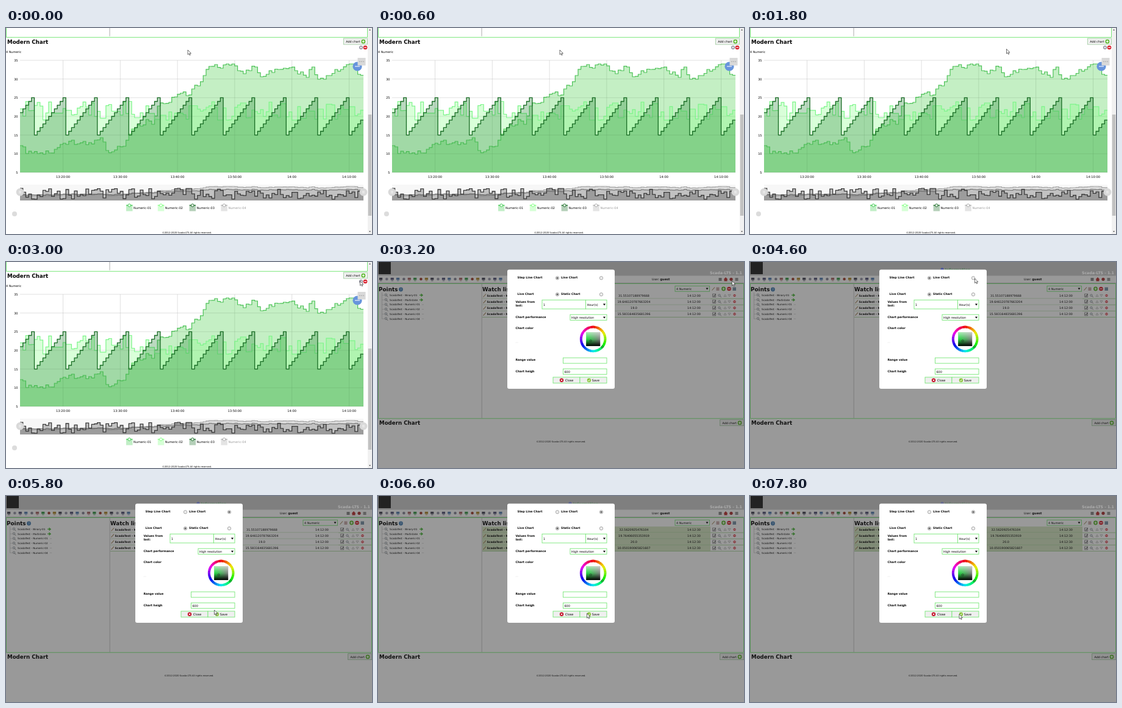
These frames come from a looping animation (600x338 px, 8 s). An HTML page:

```html
<!DOCTYPE html>
<html lang="en">
<head>
<meta charset="utf-8">
<title>Modern Chart</title>
<style>
html, body { margin: 0; width: 100%; height: 100%; overflow: hidden; background: #fff; }
svg { display: block; width: 600px; height: 338px; font-family: "DejaVu Sans", sans-serif; }
</style>
</head>
<body>
<svg id="stage" viewBox="0 0 600 338"></svg>
<script>
const LOOP = 8000, STEP = 200, OPEN = 3200, PICK = 5200, REFRESH = 6000;
const GREEN = '#78e678';

// Markup helpers
const text = (x, y, s, size = 5, more = '') => `<text x="${x}" y="${y}" font-size="${size}" ${more}>${s}</text>`;
const rect = (x, y, w, h, fill, more = '') => `<rect x="${x}" y="${y}" width="${w}" height="${h}" fill="${fill}" ${more}/>`;
const disc = (x, y, r, fill, more = '') => `<circle cx="${x}" cy="${y}" r="${r}" fill="${fill}" ${more}/>`;
const path = (d, stroke, w = 1, more = '') => `<path d="${d}" fill="none" stroke="${stroke}" stroke-width="${w}" ${more}/>`;
const group = (id, body) => `<g id="${id}">${body}</g>`;
const BOLD = 'font-weight="bold"', MID = 'text-anchor="middle"', END = 'text-anchor="end"';

function seeded(seed) {
  return () => (seed = (seed * 16807) % 2147483647) / 2147483647;
}

const plus = (x, y) => disc(x, y, 3.4, '#5bb82d') + path(`M${x - 2} ${y}h4M${x} ${y - 2}v4`, '#fff', 1.2);
const minus = (x, y, r = 3.3) => disc(x, y, r, '#d81e2c') + path(`M${x - r * .6} ${y}h${r * 1.2}`, '#fff', 1.2);
const lens = (x, y) => disc(x, y, 1.8, '#dfe8f0', 'stroke="#888" stroke-width=".7"') + path(`M${x + 1.3} ${y + 1.3}l2 2`, '#777', .9);
const pencil = (x, y) => path(`M${x - 2} ${y + 2.5}l4.5-5`, '#a58a60', 1.1);
const addButton = (x, y) => rect(x, y, 39, 10, '#f1f1f1', `stroke="#8fc48f" stroke-width=".7"`) +
  text(x + 3.8, y + 6.8, 'Add chart', 4.8) + plus(x + 32.3, y + 5.2);
const field = (x, y, w, h, label = '', arrow = false) => rect(x, y, w, h, '#fff', `stroke="${GREEN}" stroke-width=".9"`) +
  text(x + 2, y + h / 2 + 1.9, label, 4.9) +
  (arrow ? `<path d="M${x + w - 6} ${y + h / 2 - 1.2}h4l-2 3z"/>` : '');

// Chart data: one value every 30 seconds
const N = 120, X0 = 23, DX = 563 / N, BASE = 237;
const scaleY = v => BASE - (v - 5) * 184 / 30;
const trendKnots = [193, 206, 205, 206, 207, 205, 199, 191, 191, 184, 190, 186, 188, 184, 180, 201, 203, 194, 194, 174,
  164, 161, 150, 158, 128, 124, 122, 113, 107, 111, 100, 95, 78, 63, 60, 66, 59, 59, 70, 75,
  70, 64, 80, 76, 73, 68, 66, 65, 70, 72, 81, 64, 84, 84, 78, 68, 68, 60, 59, 76];
const jitter = seeded(77), wobble = seeded(4242), spikes = seeded(991);
const trend = Array.from({ length: N }, (_, i) => {
  const a = trendKnots[i >> 1], b = trendKnots[Math.min((i >> 1) + 1, 59)];
  return i % 2 ? Math.max(59, (a + b) / 2 + (jitter() - .5) * 9) : a;
});
let held = 22;
const noise = Array.from({ length: N }, () => {
  if (wobble() > .25) held = 19 + 5 * wobble() ** 1.2;
  return scaleY(held);
});
const saw = Array.from({ length: N }, (_, i) => scaleY(15 + (i + 6) % 11));
const pulse = Array.from({ length: N }, () => 263 + 18 * spikes());

const stepLine = ys => `M${X0} ${ys[0].toFixed(1)}` +
  ys.map((y, i) => `V${y.toFixed(1)}H${(X0 + (i + 1) * DX).toFixed(1)}`).join('');
const area = (ys, base, fill, stroke, w = 1.2) => {
  const d = stepLine(ys);
  return `<path d="${d}V${base}H${X0}Z" fill="${fill}" fill-opacity=".3"/>` + path(d, stroke, w);
};

function chartPage() {
  let s = rect(0, 0, 600, 338, '#fff');
  s += path('M.5 0V15.3H592.5V0', GREEN, 1) + path('M170 0V13.5', '#999', .8);
  s += text(2, 26, 'Modern Chart', 8.7, BOLD) + text(0, 41, '4 Numeric', 4.9) + addButton(553.5, 17);
  s += disc(582, 32, 2.3, '#eee', 'stroke="#8a8a9a" stroke-width="1.3"') + minus(589, 32);
  let grid = '';
  for (let v = 5; v <= 35; v += 5) {
    grid += `M${X0} ${scaleY(v).toFixed(1)}H586`;
    s += text(19.5, scaleY(v) + 1.9, v, 5, END);
  }
  ['13:20:00', '13:30:00', '13:40:00', '13:50:00', '14:00', '14:10:00'].forEach((label, i) => {
    const x = 93.5 + i * 93.8;
    grid += `M${x} 53V237`;
    s += text(x, 246, label, 5.1, MID);
  });
  s += path(grid, '#d9d9d9', .6);
  s += area(trend, BASE, '#3eca3e', '#4cc257') + area(noise, BASE, '#80ff80', '#7df58a') + area(saw, BASE, '#1f8030', '#176b23', 1.3);
  s += path(grid, '#000', .5, 'opacity=".07"');
  s += disc(576, 63, 7.6, '#6794dc') + path('M572 63h8', '#fff', 1.1);
  s += rect(576.5, 49, 13, 12.5, '#d9d9d9') + [580, 583, 586].map(x => disc(x, 55, .6, '#666')).join('');

  // Range preview
  s += rect(23, 257, 563, 26, '#f7f7f7');
  s += area(trend.map(y => 260 + (y - 59) * .105), 283, '#999', '#a5a5a5');
  s += area(trend.map((y, i) => 264.5 + (y - 59) * .06 + i % 3 * .4), 283, '#888', '#666', 1);
  s += area(pulse, 283, '#444', '#3a3a3a', 1.3);
  s += disc(23, 269.3, 6.3, '#d9d9d9') + disc(586, 269.3, 6.3, '#d9d9d9');
  s += path('M22 267v4.6M24 267v4.6M585 267v4.6M587 267v4.6', '#fff', .7);

  ['#3eca50', '#80ff80', '#176b23', '#aaa'].forEach((c, i) => {
    const x = 197 + i * 51.8;
    s += rect(x, 290, 10.5, 10.5, c, 'opacity=".32"') + path(`M${x} 291h10.5`, c, 1.1);
    s += disc(x + 5.2, 291, 2.3, '#fff', `stroke="${c}"`);
    s += text(x + 12, 297, 'Numeric-0' + (i + 1), 5, i === 3 ? 'fill="#999"' : '');
  });
  s += disc(14, 305, 4, '#dcdcdc');
  s += text(296.5, 336.7, '©2012-2020 Scada-LTS All rights reserved.', 3.75, MID);
  s += rect(593, 0, 7, 338, '#f1f1f1') + rect(593.7, 142, 5.6, 166, '#c1c1c1');
  s += `<path d="M595 4l1.5-2 1.5 2zM595 333l1.5 2 1.5-2z" fill="#555"/>`;
  return s;
}

function toolbar() {
  const tints = ['#445', '#557', '#889', '#3a9a4a', '#b08a30', '#99a', '#567fb0', '#a66', '#a04030'];
  let s = '';
  for (let i = 0; i < 22; i++) {
    const x = 2 + i * 9.35, c = tints[i * 5 % 9];
    s += i % 3 === 1 ? disc(x + 3, 28, 2.3, c) : rect(x, 25.8, 5.2, 3.6, c) + path(`M${x + 1} 30.8h3.4`, c, .8);
  }
  s += rect(558.5, 26, 5, 5, '#888') + disc(579, 28.3, 2.6, '#a33') + rect(585.5, 26, 5, 5, '#999');
  return s + `<path d="M566.5 28.5l3.5-3.4 3.5 3.4h-1v3h-5v-3z" fill="#b33"/>`;
}

function listPage() {
  let s = rect(0, 0, 600, 338, '#fff') + rect(0, 0, 600, 22.5, '#cfcfcf') + path('M0 34.5H600', '#aaa', .7) + toolbar();
  s += text(449, 30.4, 'User:', 4.7) + text(462.5, 30.4, 'guest', 5, BOLD);
  s += path('M.5 35.5H599.5V256.8H.5Z', '#80f080', 1) + path('M170.2 36V256', '#bbb', .8);
  s += text(1, 47.7, 'Points', 8.9, BOLD) + disc(37.5, 45, 3.4, '#4a80b5') + text(37.5, 46.9, '?', 5, MID + ' fill="#fff"');
  s += path('M6.5 50V93.5', '#bbb', .6);
  ['Binary-01', 'Multistate', 'Numeric-01', 'Numeric-02', 'Numeric-03', 'Numeric-04'].forEach((name, i) => {
    const y = 54.4 + i * 7.75;
    s += path(`M6.5 ${y}h4`, '#bbb', .6) + lens(13, y - .4) + text(19, y + 1.4, 'ScadaTest - ' + name, 4.2);
    s += i < 2 ? path(`M68 ${y}h4m-1.5-2l2.5 2-2.5 2`, '#4db83d', 1.4) : path(`M72 ${y}h3`, '#ccc', .8);
  });
  s += text(171, 47.6, 'Watch list', 8.7, BOLD) + field(487, 39.3, 56.5, 9, '4 Numeric', true);
  s += pencil(549.5, 44) + rect(554.5, 41.5, 5, 5.5, '#c9a9a9') + plus(566.5, 44) + minus(575.5, 44) + rect(581.5, 41.5, 5.5, 5.5, '#7893a8');
  for (let i = 0; i < 4; i++) {
    const y = 55 + i * 10.15;
    s += rect(171, y - 4.9, 374, 10, '#fff', 'class="row"') + path(`M171 ${y + 5.1}H599`, '#8fc87f', .7);
    s += pencil(174.5, y) + text(178.5, y + 1.7, 'ScadaTest - Numeric-0' + (i + 1), 4.55, BOLD);
    s += text(419.5, y + 1.8, '', 4.85, MID + ' class="value"') + text(518, y + 1.8, '', 4.85, MID + ' class="clock"');
    s += rect(548.7, y - 2.5, 5, 5, '#fff', 'stroke="#555" stroke-width=".6"') + path(`M549.7 ${y}l1.3 1.4 2-3`, '#222', .9);
    s += lens(559.5, y - .3) + path(`M567 ${y + 1.6}l2-3.4 2 3.4zM574 ${y - 1.6}l2 3.4 2-3.4z`, '#aaa', .7) + minus(584.5, y, 2.1);
  }
  s += text(2, 267, 'Modern Chart', 8.7, BOLD) + addButton(560.7, 258.7);
  s += text(300, 296, '©2012-2020 Scada-LTS All rights reserved.', 3.75, MID);
  s += rect(0, 0, 600, 338, '#212121', 'opacity=".46"');
  s += rect(1, 0, 20, 20, '#222') + text(544, 19.8, 'Scada-LTS - 1.1', 6.2, BOLD + ' fill="#acacac"');
  s += group('info', disc(315, 12, 2.6, '#4450a0') + text(319.5, 14.6, 'Information', 6.3, BOLD + ' fill="#3f7a4a"'));
  return s + modal();
}

function colorWheel(cx, cy) {
  let s = '';
  const at = (deg, r = 19.8) => {
    const a = (deg - 90) * Math.PI / 180;
    return `${(cx + r * Math.cos(a)).toFixed(2)} ${(cy + r * Math.sin(a)).toFixed(2)}`;
  };
  for (let h = 0; h < 360; h += 10) s += path(`M${at(h - .5)}A19.8 19.8 0 0 1 ${at(h + 10.5)}`, `hsl(${h + 5} 95% 48%)`, 4);
  s += rect(cx - 11.5, cy - 11, 23, 22.5, 'url(#sat)') + rect(cx - 11.5, cy - 11, 23, 22.5, 'url(#lum)');
  s += disc(cx + 15, cy + 13, 1.7, 'none', 'stroke="#222" stroke-width=".6"');
  return s + disc(cx - 4, cy + 3, 1.6, 'none', 'stroke="#222" stroke-width=".6"');
}

const radio = (x, y, id, on) => disc(x, y, 2.7, '#eee', 'stroke="#8a8a8a" stroke-width=".7"') +
  disc(x, y, 1.4, '#555', `id="${id}" opacity="${+on}"`);

function modal() {
  const label = (x, y, s) => text(x, y, s, 4.7, BOLD);
  let s = rect(212, 12.5, 176, 195.5, '#fff', 'rx="3"');
  s += label(228.5, 27.3, 'Step Line Chart') + label(300, 27.3, 'Line Chart');
  s += label(228.5, 54.2, 'Live Chart') + label(300, 54.2, 'Static Chart');
  s += radio(294, 26.3, 'stepped', true) + radio(366, 26.3, 'smooth', false);
  s += radio(294, 53.2, 'live', true) + radio(366, 53.2, 'static', false);
  s += label(225.5, 67.2, 'Values from') + label(225.5, 73.4, 'last:');
  s += field(269, 62.3, 71.5, 14.7, '1') + field(340.5, 62.3, 34.5, 14.7, 'Hour(s)', true);
  s += label(225.5, 91.6, 'Chart performance') + field(315, 86.2, 60, 9.3, 'High resolution', true);
  s += label(225.5, 109.6, 'Chart color') + [226, 227.5, 229].map(x => disc(x, 132, .35, '#aaa')).join('');
  s += colorWheel(352.7, 126.4);
  s += label(225.5, 162.4, 'Range value') + field(303.5, 157.2, 71.5, 9);
  s += label(225.5, 180.6, 'Chart heigh') + field(303.5, 175.3, 71.5, 9, '600');
  for (const x of [287, 331]) s += rect(x, 189, 44, 9.8, '#efefef', `stroke="${GREEN}" stroke-width=".9"`);
  s += disc(301, 194, 3.2, '#c4182c') + path('M299.7 192.7l2.6 2.6m0-2.6l-2.6 2.6', '#fff', .9) + text(306.8, 195.8, 'Close', 5);
  s += disc(346, 194, 3.2, '#8cc63f') + path('M344.4 194l1.2 1.4 2-2.8', '#fff', .9) + text(350.8, 195.8, 'Save', 5);
  return s;
}

const stage = document.getElementById('stage');
stage.innerHTML = `<defs>
  <linearGradient id="sat"><stop stop-color="#20dc40"/><stop offset="1" stop-color="#808080"/></linearGradient>
  <linearGradient id="lum" x2="0" y2="1"><stop stop-color="#fff" stop-opacity=".6"/><stop offset=".5" stop-color="#fff" stop-opacity="0"/>
  <stop offset=".5" stop-color="#000" stop-opacity="0"/><stop offset="1" stop-color="#000"/></linearGradient></defs>` +
  group('chart', chartPage()) + group('list', listPage()) +
  group('cursor', '<path d="M0 0V7.6L1.8 6 3 8.7 4.3 8.1 3.1 5.6H5.4Z" fill="#fff" stroke="#111" stroke-width=".6"/>');

const el = id => document.getElementById(id);
const values = stage.querySelectorAll('.value'), clocks = stage.querySelectorAll('.clock'), rows = stage.querySelectorAll('.row');
const before = ['31.55107188979668', '19.646120787663204', '19.0', '15.583164835681396'];
const after = ['32.5620925476104', '19.76406055353919', '20.0', '10.050190065821607'];

// Keys: time, then the values to interpolate
const cursorKeys = [[1200, 298, 36], [2400, 543, 33], [3000, 580.5, 31], [3600, 580, 31], [4400, 372, 28], [4600, 368.5, 27],
  [5200, 368.5, 27], [5800, 341.5, 187], [6200, 341.5, 190], [6800, 343, 194]];
const infoKeys = [[3200, 0], [4400, .9], [5200, .9], [5800, .6], [7800, .45]];

function sample(keys, t) {
  const i = keys.findIndex(k => k[0] > t);
  if (i < 1) return keys[i === 0 ? 0 : keys.length - 1].slice(1);
  const a = keys[i - 1], b = keys[i], p = (t - a[0]) / (b[0] - a[0]);
  return a.slice(1).map((v, j) => v + (b[j + 1] - v) * p);
}

function draw(time) {
  const t = Math.floor(time % LOOP / STEP) * STEP;
  const open = t >= OPEN, picked = t >= PICK, fresh = t >= REFRESH;
  el('chart').style.display = open ? 'none' : '';
  el('list').style.display = open ? '' : 'none';
  el('stepped').setAttribute('opacity', picked ? 0 : 1);
  el('smooth').setAttribute('opacity', picked ? 1 : 0);
  el('info').setAttribute('opacity', sample(infoKeys, t)[0]);
  el('cursor').setAttribute('transform', `translate(${sample(cursorKeys, t)})`);
  rows.forEach((row, i) => {
    row.setAttribute('fill', fresh ? '#d5e6c4' : '#fff');
    values[i].textContent = (fresh ? after : before)[i];
    clocks[i].textContent = fresh ? '14:12:30' : '14:12:00';
  });
}

const start = performance.now();
function tick() {
  draw(performance.now() - start);
  requestAnimationFrame(tick);
}
tick();
</script>
</body>
</html>
```
